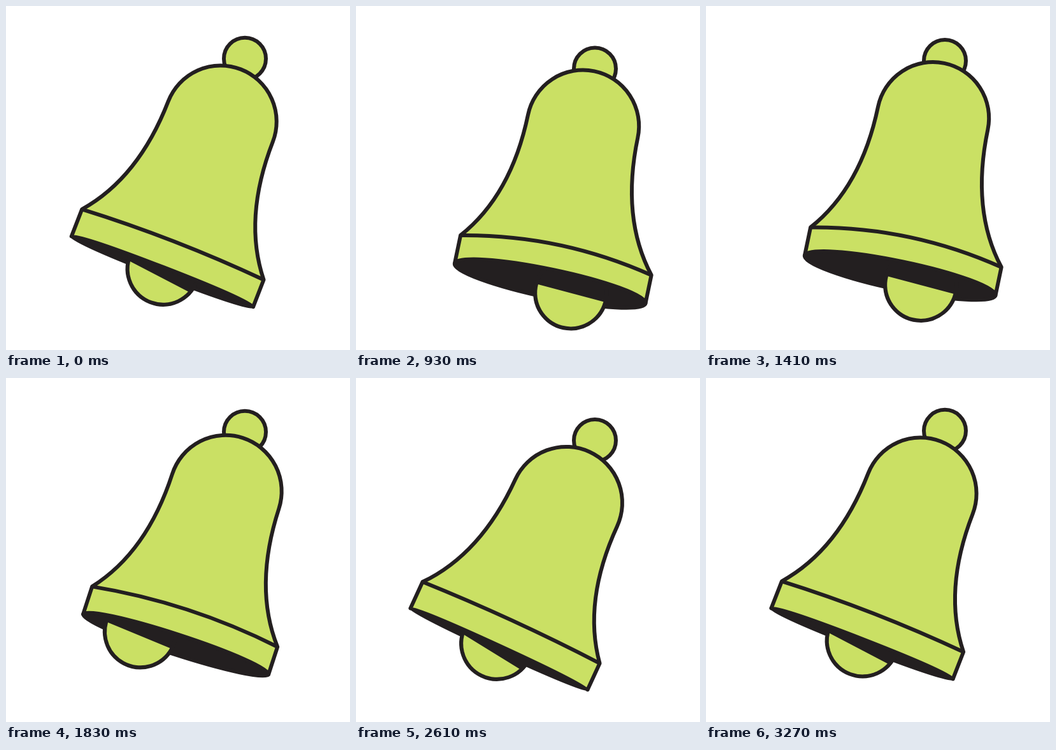
These frames come from a looping animation (540x540 px, 3.3 s). An HTML page with a canvas:

```html
<!DOCTYPE html>
<html lang="en">
<head>
<meta charset="utf-8">
<title>Ringing bell</title>
<style>
html, body { margin: 0; width: 100%; height: 100%; overflow: hidden; background: #fff; }
canvas { display: block; }
</style>
</head>
<body>
<canvas id="stage" width="540" height="540"></canvas>
<script>
const ctx = document.getElementById('stage').getContext('2d');
const LOOP = 3300, LIME = '#cae064', INK = '#231f20', RAD = Math.PI / 180;
const LAG = 29;          // the clapper trails the bell by this many ms
const HALF = 153, BAND = 315.5, RIM = 361;   // half width, top and bottom of the band

// Turning points of the swing: [ms, degrees]
const keys = [[0, 21.2], [180, 18.4], [300, 25.2], [420, 19], [520, 18.4], [670, 23.4], [900, 6.1]];
for (let t = 1020; t <= 1740; t += 120) keys.push([t, (t - 1020) % 240 ? 6.1 : 42.6]);
keys.push([1860, 14.1], [2010, 31], [2160, 13.2], [2300, 27.8], [2440, 17], [2575, 25.8],
  [2700, 20], [2830, 25.3], [2960, 18.3], [3130, 22], [LOOP, 21.2]);

function swing(time) {
  const t = (time + LOOP) % LOOP;
  const i = keys.findIndex(k => k[0] > t);
  const [t0, a] = keys[i - 1], [t1, b] = keys[i];
  return a + (b - a) * (1 - Math.cos(Math.PI * (t - t0) / (t1 - t0))) / 2;
}

function paint(fill) {
  ctx.fillStyle = fill;
  ctx.fill();
  ctx.stroke();
}

function ball(x, y, r, fill) {
  ctx.beginPath();
  ctx.arc(x, y, r, 0, 2 * Math.PI);
  paint(fill);
}

function clapper(angle, cut, drop) {
  ctx.save();
  ctx.rotate(angle * RAD);
  ctx.translate(0, 354);
  ball(0, 0, 56, INK);
  ctx.rotate((cut - angle) * RAD);
  const edge = Math.asin(drop / 53);
  ctx.beginPath();
  ctx.arc(0, 0, 53, edge, Math.PI - edge);
  ctx.fillStyle = LIME;
  ctx.fill();
  ctx.restore();
}

function mouth(open, shift) {
  ctx.beginPath();
  ctx.ellipse(0, RIM + shift, HALF, open, 0, 0, 2 * Math.PI);
  paint(INK);
}

function body(open, shift) {
  ctx.save();
  ctx.translate(0, shift);
  ctx.beginPath();
  ctx.moveTo(-HALF, BAND);
  ctx.bezierCurveTo(-110, 264, -88, 197, -88, 108.5);
  ctx.arc(0, 108.5, 88, Math.PI, 0);
  ctx.bezierCurveTo(88, 197, 110, 264, HALF, BAND);
  ctx.lineTo(HALF, RIM);
  ctx.ellipse(0, RIM, HALF, open, 0, 0, Math.PI, true);
  ctx.closePath();
  paint(LIME);
  ctx.beginPath();
  ctx.moveTo(-HALF, BAND);
  ctx.quadraticCurveTo(0, BAND - 1.5 * open, HALF, BAND);
  ctx.stroke();
  ctx.restore();
}

function draw(t) {
  const angle = swing(t);
  const flat = Math.exp(-(((angle - 23.5) / 5.5) ** 2));   // 1 when the rim is seen edge-on
  const open = 4 + 18.5 * (1 - flat), shift = -0.9 * (open - 4);

  ctx.fillStyle = '#fff';
  ctx.fillRect(0, 0, 540, 540);
  ctx.lineWidth = 6;
  ctx.lineJoin = 'round';
  ctx.strokeStyle = INK;

  ctx.save();
  ctx.translate(375, 82.8 + 16.3 * Math.sin(2 * Math.PI * t / LOOP) ** 2);
  ball(0, 0, 33, LIME);
  ctx.save();
  ctx.rotate(angle * RAD);
  mouth(open, shift);
  ctx.restore();
  clapper(swing(t - LAG), angle + 3 + 4 * flat, 16 * flat);
  ctx.rotate(angle * RAD);
  body(open, shift);
  ctx.restore();
}

const start = performance.now();
function tick() {
  draw((performance.now() - start) % LOOP);
  requestAnimationFrame(tick);
}
tick();
</script>
</body>
</html>
```
